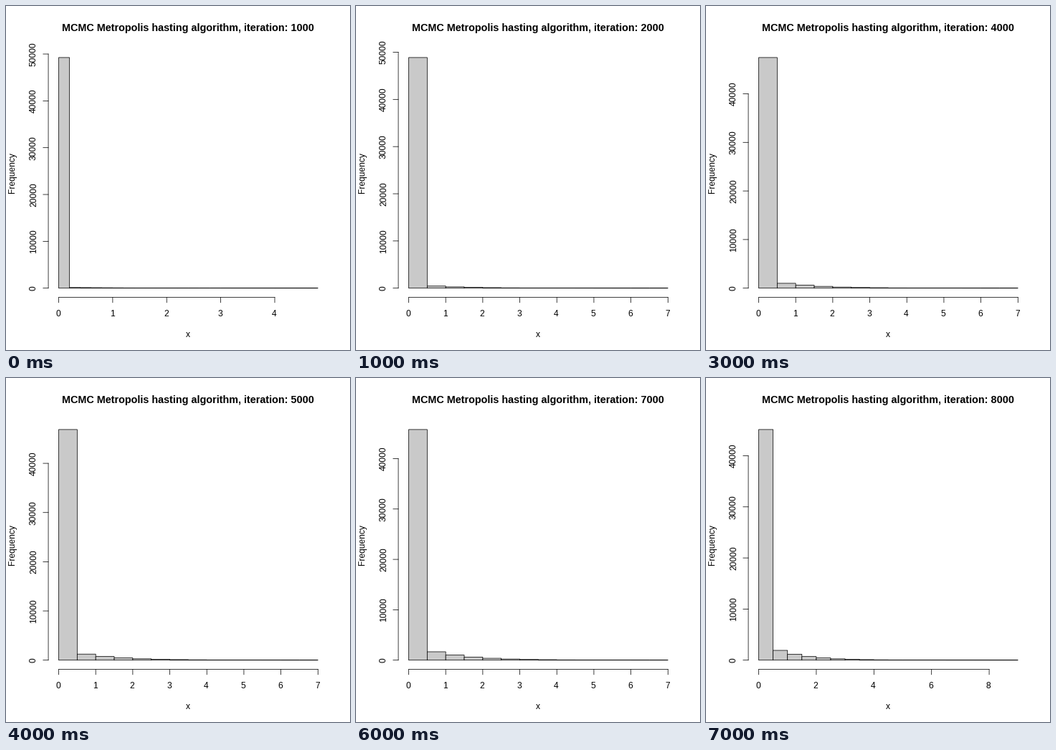
These frames come from a looping animation (480x480 px, 8000 ms). A matplotlib script:

```python
import matplotlib.pyplot as plt
import numpy as np
from matplotlib.animation import FuncAnimation
from matplotlib.patches import Rectangle

plt.rcParams["font.family"] = "Liberation Sans"

SIZE = 480
THIN = 0.5625          # three quarters of a pixel at 96 dpi
SMALL, LARGE = 9, 10.8
SAMPLES = 50000
LEFT, RIGHT = 73.51, 435.29
BASE, TOP = 393.69, 71.91
AXIS_X, AXIS_Y, TICK = 59.04, 406.56, 7.2
CENTER_X, CENTER_Y = 254.4, 232.8
SHIFT = 0.8            # centres short labels on their glyphs

# chains still in the first bin after each 1000 iterations
FIRST_BIN = [49250, 48873, 48150, 47461, 46870, 46266, 45773, 45131]

fig = plt.figure(figsize=(5, 5), dpi=96, facecolor="white")
ax = fig.add_axes([0, 0, 1, 1])


def line(x0, y0, x1, y1):
    ax.plot([x0, x1], [y0, y1], color="black", lw=THIN, snap=False)


def label(x, y, text, size=SMALL, rotation=0, weight="normal"):
    ax.text(x, y, text, size=size, weight=weight, rotation=rotation,
            rotation_mode="anchor", ha="center", va="baseline")


def x_range(i):
    """Largest x, bin width and tick step of the histogram."""
    if i == 0:
        return 4.8, 0.2, 1
    if i < 7:
        return 7, 0.5, 1
    return 9, 0.5, 2


def draw(i):
    ax.cla()
    ax.set(xlim=(0, SIZE), ylim=(SIZE, 0))
    ax.axis("off")

    peak = FIRST_BIN[i]
    x_max, width, step = x_range(i)

    def px(x):
        return LEFT + x / x_max * (RIGHT - LEFT)

    def py(count):
        return BASE - count / peak * (BASE - TOP)

    # the remaining chains follow an exponential tail past the first bin
    edges = np.arange(round(x_max / width) + 1) * width
    counts = -(SAMPLES - peak) * np.diff(np.exp(width - edges))
    counts[0] = peak
    for x, count in zip(edges, counts):
        ax.add_patch(Rectangle((px(x), py(count)), px(width) - px(0),
                               BASE - py(count), fc="#c9c9c9", ec="black",
                               lw=THIN, snap=False))

    x_ticks = np.arange(0, int(x_max) + 1, step)
    line(px(0), AXIS_Y, px(x_ticks[-1]), AXIS_Y)
    for x in x_ticks:
        line(px(x), AXIS_Y, px(x), AXIS_Y + TICK)
        label(px(x) - SHIFT, 433, str(x))

    y_ticks = np.arange(0, peak * 1.04, 10000, dtype=int)
    line(AXIS_X, BASE, AXIS_X, py(y_ticks[-1]))
    for y in y_ticks:
        line(AXIS_X - TICK, py(y), AXIS_X, py(y))
        label(42, py(y), str(y), rotation=90)

    label(CENTER_X, 35,
          f"MCMC Metropolis hasting algorithm, iteration: {(i + 1) * 1000}",
          size=LARGE, weight="bold")
    label(CENTER_X - SHIFT, 462, "x")
    label(12, CENTER_Y, "Frequency", rotation=90)
    return []


anim = FuncAnimation(fig, draw, frames=8, interval=1000, init_func=lambda: [],
                     repeat=True, repeat_delay=0)
plt.show()
```
